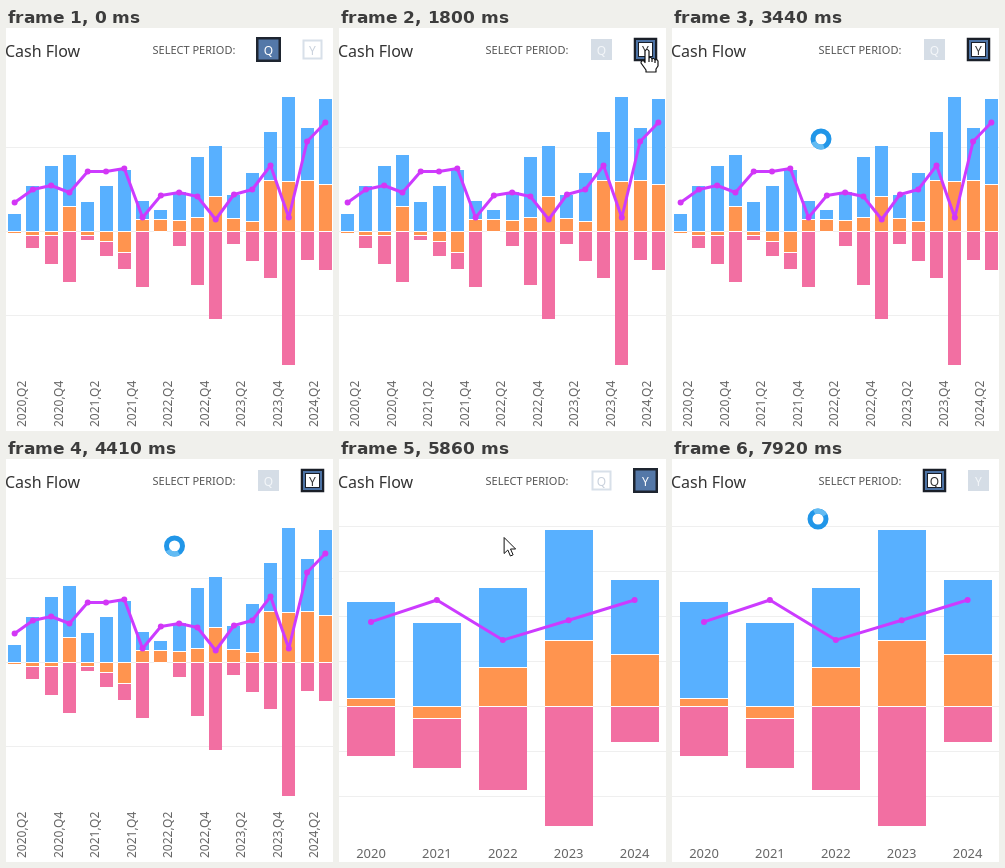
Animation, 327 px wide and 403 px high, one loop 7.99 s. Source, as an HTML page:

```html
<!DOCTYPE html>
<html>
<head>
<meta charset="utf-8">
<style>
  html, body { margin: 0; width: 327px; height: 403px; overflow: hidden; background: #fff; }
  svg { display: block; font-family: "Noto Sans", "Open Sans", sans-serif; }
</style>
</head>
<body>
<svg id="stage" width="327" height="403" viewBox="0 0 327 403"></svg>
<script>
const LOOP = 7990;
const COLORS = ['#58b0ff', '#ff944f', '#f26fa2'];

// Quarterly amounts; the line is their net plus a base that is set per year
const income = [18, 46, 66, 52, 30, 46, 62, 19, 10, 29, 61, 51, 24, 49, 49, 85, 53, 86];
const other = [-2, -4, -4, 25, -4, -10, -21, 12, 12, 11, 14, 35, 13, 10, 51, 50, 51, 47];
const spent = [0, 13, 29, 51, 5, 15, 17, 56, 0, 15, 54, 88, 13, 30, 47, 134, 29, 39];
const base = [14, 40, 15, 14, 16];

const quarterly = income.map((v, i) =>
  [v, other[i], spent[i], v + other[i] - spent[i] + base[i >> 2]]);
const yearly = base.map((_, y) =>
  quarterly.slice(y * 4, y * 4 + 4).reduce((sum, q) => sum.map((v, k) => v + q[k])));

const quarters = { rows: quarterly, scale: 1, zero: 204, left: 2.11, step: 18.28, width: 13 };
const years = { rows: yearly, scale: 0.535, zero: 248, left: 8, step: 65.9, width: 48 };

// Pointer moves: start time, x, y
const MOVE_TIME = 400;
const MOVES = [
  [390, 256, 26], [1020, 250, 12], [1310, 308, 21], [2330, 260.5, 119], [2750, 149, 111],
  [4000, 168.5, 87], [5300, 126, 97], [5700, 236, 45], [6140, 261, 24], [7220, 146, 60]
];

const clamp = v => Math.min(1, Math.max(0, v));
const rect = (x, y, w, h, attrs) =>
  `<rect x="${x}" y="${y}" width="${w}" height="${h}" ${attrs}/>`;
const text = (x, y, size, fill, str, attrs = '') =>
  `<text x="${x}" y="${y}" font-size="${size}" fill="${fill}" ${attrs}>${str}</text>`;
const inside = (p, r) =>
  p.x >= r.x && p.x <= r.x + r.w && p.y >= r.y && p.y <= r.y + r.h;

function buildChart(chart, labels) {
  const { rows, scale, zero, left, step, width } = chart;
  chart.parts = [];
  const points = rows.map(([blue, orange, pink, total], i) => {
    const up = Math.max(orange, 0), down = Math.max(-orange, 0);
    const edges = [-up - blue, -up, down, down + pink].map(v => Math.round(zero + v * scale));
    COLORS.forEach((fill, k) => {
      const h = edges[k + 1] - edges[k] - 1;
      if (h > 0) chart.parts.push({ x: Math.round(left + i * step), y: edges[k], w: width, h, fill });
    });
    return [left + width / 2 + i * step, zero + 0.5 - total * scale];
  });

  let grid = '';
  for (let k = -2; k <= 4; k++) {
    const y = Math.round(zero - 1 - k * 84 * scale);
    if (y > 60 && y < 340) grid += rect(0, y, 327, 1, 'fill="#efefef"');
  }
  return grid +
    chart.parts.map(p => rect(p.x, p.y - 1, p.w, p.h + 2, 'fill="#fff"')).join('') +
    chart.parts.map(p => rect(p.x, p.y, p.w, p.h, `fill="${p.fill}"`)).join('') +
    `<polyline points="${points.join(' ')}" fill="none" stroke="#cc3bff" stroke-width="3" stroke-linejoin="round"/>` +
    `<g fill="#d336f5">${points.map(([x, y]) => `<circle cx="${x}" cy="${y}" r="3"/>`).join('')}</g>` +
    labels;
}

const quarterLabels = Array.from({ length: 9 }, (_, i) =>
  text(0, 0, 12, '#666', `${2020 + (i >> 1)},Q${i % 2 ? 4 : 2}`,
    `transform="translate(${20 + i * 36.5} 399) rotate(-90)"`)).join('');
const yearLabels = yearly.map((_, i) =>
  text(32 + i * years.step, 399, 13, '#666', 2020 + i, 'text-anchor="middle"')).join('');

document.getElementById('stage').innerHTML =
  text(-1, 29, 16, '#333', 'Cash Flow') +
  text(146.5, 26, 11, '#555', 'SELECT PERIOD:') +
  `<g id="quarterly">${buildChart(quarters, quarterLabels)}</g>
   <g id="yearly">${buildChart(years, yearLabels)}</g>
   <rect id="outline" fill="none" stroke="#111" stroke-width="1.5"/>
   <g id="buttons"></g>
   <g id="pointer">
     <path id="arrow" fill="#fff" stroke="#111" d="M0 0V16L3.7 12.5L6.3 18.5L9 17.3L6.4 11.5H11.5Z"/>
     <path id="hand" fill="#fff" stroke="#111" stroke-width="1.2" stroke-linejoin="round"
       d="M-2 2Q0-1 2 2V9Q4 7.5 5 10Q7 8.5 8 11Q10 10 11 12V17L9 20V23H-1V21L-6 14Q-6 11-3 12L-2 13.5ZM2 9V13M5 10V13M8 11V14"/>
     <g id="spinner" fill="none" stroke-width="5">
       <circle r="8" fill="#fff" stroke="#2196e8"/>
       <path id="glow" d="M0-8A8 8 0 0 1 8 0" stroke="#62bbf3"/>
     </g>
   </g>`;

const el = id => document.getElementById(id);
const show = (id, on) => el(id).setAttribute('visibility', on ? 'visible' : 'hidden');

function button(x, letter, state, hovered) {
  const framed = (inset, stroke, width, fill) =>
    rect(x + inset, 9 + inset, 25 - 2 * inset, 25 - 2 * inset,
      `fill="${fill}" stroke="${stroke}" stroke-width="${width}"`);
  const label = fill => text(x + 12.5, 26.5, 12, fill, letter, 'text-anchor="middle"');
  if (state === 'on') return framed(1.25, '#1e2530', 2.5, '#5478a8') + label('#fff');
  if (state === 'grey') return framed(2.5, '#d5dde6', 1, '#d5dde6') + label('#f3f6f9');
  if (state === 'ring')
    return framed(2, '#1a1f28', 2.5, '#fff') + framed(4, '#4d73a5', 2, '#fff') +
      framed(5.5, '#1a1f28', 1, '#fff') + label('#333');
  return (hovered ? framed(1.25, '#1a1a1a', 2.5, '#fff') : '') +
    framed(3.5, '#d8e0e9', 2, '#fff') + label('#c9d1dc');
}

function pointerAt(t) {
  return MOVES.reduce((p, [start, x, y]) => {
    const u = clamp((t - start) / MOVE_TIME);
    const e = u * u * (3 - 2 * u);
    return { x: p.x + (x - p.x) * e, y: p.y + (y - p.y) * e };
  }, { x: 324, y: 248 });
}

function states(t) {
  if (t < 1800) return ['on', 'off'];
  if (t < 4830) return ['grey', 'ring'];
  if (t < 6690) return ['off', 'on'];
  return ['ring', 'grey'];
}

function draw(t) {
  const visible = t >= 390;
  const p = pointerAt(t);
  const over = x => visible && inside(p, { x, y: 9, w: 25, h: 25 });
  const overQ = over(250), overY = over(294);
  const [q, y] = states(t);
  el('buttons').innerHTML = button(250, 'Q', q, overQ) + button(294, 'Y', y, overY);

  const fade = clamp((t - 4620) / 210);
  el('quarterly').setAttribute('opacity', 1 - fade);
  el('yearly').setAttribute('opacity', fade);

  const bar = visible && (fade < 0.5 ? quarters : years).parts.find(r => inside(p, r));
  show('outline', bar);
  if (bar) {
    const box = { x: bar.x - 1.5, y: bar.y - 1.5, width: bar.w + 3, height: bar.h + 3 };
    for (const k in box) el('outline').setAttribute(k, box[k]);
  }

  const hand = overQ || overY || bar;
  const busy = q === 'ring' || y === 'ring';
  show('hand', visible && hand);
  show('spinner', visible && !hand && busy);
  show('arrow', visible && !hand && !busy);
  el('pointer').setAttribute('transform', `translate(${p.x} ${p.y})`);
  el('glow').setAttribute('transform', `rotate(${t * 0.36})`);
}

const start = performance.now();
function tick() {
  draw((performance.now() - start) % LOOP);
  requestAnimationFrame(tick);
}
tick();
</script>
</body>
</html>
```
